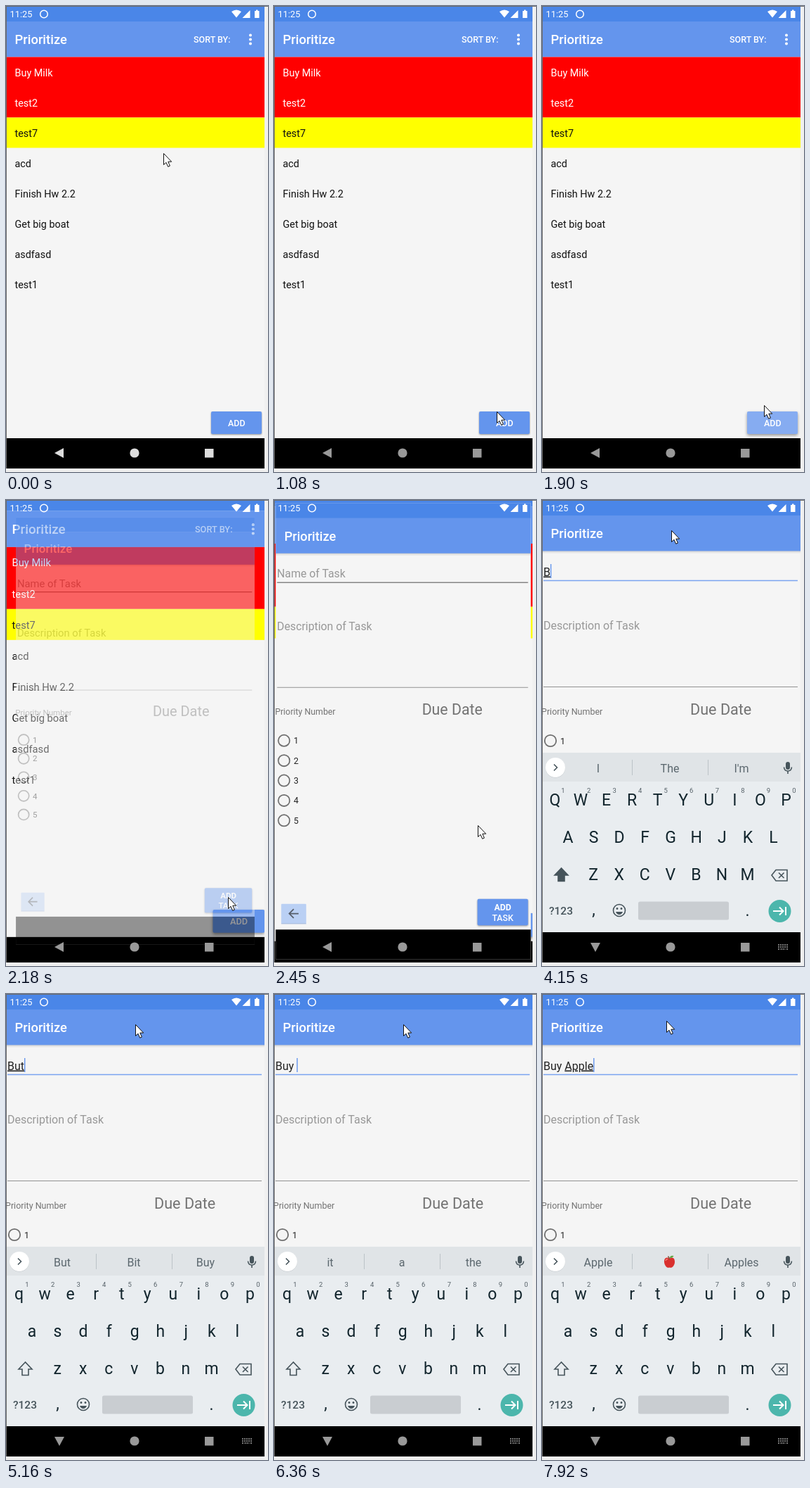
Write an HTML page that moves like this. It is 373 px wide and 662 px high and loops after 8 s.

```html
<!DOCTYPE html>
<html lang="en">
<head>
<meta charset="utf-8">
<title>Task list</title>
<style>
  html, body { margin: 0; width: 100%; height: 100%; overflow: hidden; background: #f0f0f0; }
  svg { display: block; width: 373px; height: 662px; font-family: Roboto, "Noto Sans", sans-serif; }
  text { white-space: pre; }
  .mid { text-anchor: middle; }
  .title { font-size: 18.4px; font-weight: 500; fill: #fff; }
  .label { font-size: 12.5px; font-weight: 500; fill: #fff; }
  .row { font-size: 14.4px; }
  .field { font-size: 16px; }
  .small { font-size: 12.5px; }
  .raised { fill: #6495ed; filter: drop-shadow(0 1px 1px rgba(0,0,0,.4)); }
  .key { font-size: 23px; fill: #12252d; }
  .digit { font-size: 9.5px; fill: #566168; }
  .line { fill: none; stroke: #46545b; stroke-width: 1.6; }
  .under { text-decoration: underline; text-decoration-thickness: 1px; text-underline-offset: 2px; }
</style>
</head>
<body>
<svg viewBox="0 0 373 662">
  <defs>
    <clipPath id="screen"><rect x="1" y="1" width="367" height="656"/></clipPath>
    <clipPath id="addShape"><rect x="292" y="576" width="72" height="32" rx="2"/></clipPath>
    <g id="bars">
      <rect width="368" height="657" fill="#f5f5f5"/>
      <rect y="22" width="368" height="50.5" fill="#6495ed"/>
      <rect width="368" height="22" fill="#4a86e8"/>
      <rect y="614" width="368" height="43"/>
      <text class="title" x="12.5" y="54">Prioritize</text>
    </g>
  </defs>
  <rect width="373" height="662" fill="#f0f0f0"/>
  <path d="M0 .5H373M.5 0V657" stroke="#6b6b6b"/>
  <g clip-path="url(#screen)">
    <rect width="368" height="657"/>
    <g id="list">
      <use href="#bars"/>
      <text class="label" x="267" y="52">SORT BY:</text>
      <g fill="#fff"><circle cx="348" cy="41.5" r="2"/><circle cx="348" cy="47.5" r="2"/><circle cx="348" cy="53.5" r="2"/></g>
      <rect y="72.5" width="368" height="86" fill="#f00"/>
      <rect y="158.5" width="368" height="43" fill="#ff0"/>
      <g id="rows"></g>
      <rect id="addButton" class="raised" x="292" y="576" width="72" height="32" rx="2"/>
      <g clip-path="url(#addShape)"><circle id="ripple" cx="317" cy="580" fill="#fff" opacity=".22"/></g>
      <text class="label mid" x="328.3" y="597">ADD</text>
    </g>
    <g id="form">
      <use href="#bars"/>
      <path d="M0 73H368" stroke="#000" stroke-opacity=".16"/>
      <path d="M0 74.5H368" stroke="#000" stroke-opacity=".06" stroke-width="2"/>
      <text id="hint" class="field" x="2" y="107.5" fill="#989898">Name of Task</text>
      <text id="entry" class="field" x="2" y="107.5" fill="#222"><tspan id="done"></tspan><tspan id="typing" class="under"></tspan></text>
      <path id="nameLine" d="M2 114.5H364" stroke-width="1.3"/>
      <rect id="caret" y="91" width="1.4" height="20" fill="#6495ed"/>
      <text class="field" x="2" y="183.5" fill="#989898">Description of Task</text>
      <path d="M2 265.5H364" stroke="#929292"/>
      <text class="small" x="-1" y="304.5" fill="#737373">Priority Number</text>
      <text x="211" y="305" font-size="21.6" fill="#737373">Due Date</text>
      <g id="radios"></g>
      <rect x="8" y="577" width="36" height="28.5" rx="1" fill="#bad0f4"/>
      <path d="M8 605.5H44" stroke="#9fb5da"/>
      <path d="M33 591H20M26 584.5L19.5 591L26 597.5" fill="none" stroke="#555d69" stroke-width="1.7"/>
      <rect class="raised" x="291" y="570" width="73" height="38" rx="2"/>
      <g class="label mid" font-weight="700"><text x="327.5" y="586.5" font-weight="700">ADD</text><text x="327.5" y="601.5">TASK</text></g>
    </g>
    <g id="keyboard">
      <rect y="359" width="368" height="256" fill="#e9edf0"/>
      <rect y="359" width="368" height="41" fill="#e0e4e7"/>
      <circle cx="19" cy="380.5" r="14" fill="#bfc5c9"/>
      <circle cx="19" cy="380" r="14" fill="#fff"/>
      <path class="line" d="M17 375.5L21.5 380L17 384.5"/>
      <path d="M128.5 369V391M236.5 369V391" stroke="#bcc3c7"/>
      <g id="words" class="field mid" fill="#5b676e"></g>
      <g id="apple">
        <path d="M181.5 376C177 372.500 173.500 376 174 381C174.500 386 178 390 181.500 388.500C185 390 188.700 386 189 381C189.300 376 186 372.500 181.500 376Z" fill="#d9302e"/>
        <path d="M176 379Q177 376 179 377" fill="none" stroke="#f58b80" stroke-width="1.3"/>
        <path d="M181.500 377Q181 374 179.500 372.500" fill="none" stroke="#74462c" stroke-width="1.300"/>
        <path d="M181.500 375Q183 370.500 187.500 372Q186 375.500 181.500 375Z" fill="#62a744"/>
      </g>
      <rect x="347" y="372" width="6" height="11" rx="3" fill="#46545b"/>
      <path class="line" d="M344.500 379.500Q345 385 350 385T355.500 379.500M350 385V389"/>
      <g id="keys"></g>
      <path id="shift" class="line" d="M27.500 523L18 533H23V541.500H32V533H37Z"/>
      <path class="line" d="M327 533L333 525.500H349V541H333ZM337 529.500L344.500 537M344.500 529.500L337 537"/>
      <text x="10" y="589" font-size="15.500" font-weight="500" fill="#46545b">?123</text>
      <text class="key mid" x="73.500" y="590">,</text>
      <text class="key mid" x="292.500" y="591">.</text>
      <circle class="line" cx="110" cy="583" r="8.500"/>
      <path d="M105 585H115Q113.500 589 110 589T105 585Z" fill="#46545b"/>
      <circle cx="107" cy="580.500" r="1.400" fill="#46545b"/><circle cx="113" cy="580.500" r="1.400" fill="#46545b"/>
      <rect x="137" y="570.500" width="129" height="26" rx="2.500" fill="#c9cdd1"/>
      <circle cx="338.500" cy="584" r="16" fill="#4cb6ac"/>
      <path d="M329 584H343M338 578.500L343.500 584L338 589.500M347 578V590" fill="none" stroke="#fff" stroke-width="2"/>
      <rect y="614" width="368" height="43"/>
    </g>
    <g fill="#fff">
      <text x="5.500" y="16" font-size="12.800">11:25</text>
      <circle cx="54" cy="11.500" r="5.300" fill="none" stroke="#fff" stroke-width="1.500"/>
      <path d="M321 8Q328 3 335 8L328 16.500ZM347.500 6V17H336.500ZM354 7H356V5.500H358.500V7H360.500V17H354Z"/>
    </g>
    <g id="nav">
      <path id="back" d="M69 635L82 628V642Z"/>
      <circle cx="183" cy="635" r="6.600"/>
      <rect x="283" y="629" width="12.500" height="12.500"/>
    </g>
    <path id="kbIcon" d="M336 632H350M336 635H350M336 638H338M339.500 638H346.500M348 638H350" stroke="#a0a0a0" stroke-width="1.700" stroke-dasharray="2 1"/>
  </g>
  <path id="pointer" d="M.5 .5V16.500L4 13.300L6.700 19.300L9.400 18.100L6.800 12.200H11.700Z" fill="#fff" stroke="#111"/>
</svg>
<script>
const LOOP = 8000;
const $ = id => document.getElementById(id);
const set = (id, attrs) => { for (const k in attrs) $(id).setAttribute(k, attrs[k]); };
const show = (id, on) => set(id, { visibility: on ? "visible" : "hidden" });
const clamp = v => Math.min(1, Math.max(0, v));
const smooth = u => u * u * (3 - 2 * u);
const mix = (a, b, u) => a + (b - a) * u;
const mixPoint = (a, b, u) => [mix(a[0], b[0], u), mix(a[1], b[1], u)];

// Progress that advances in n equal jumps, the first at `from`, the last at `to`.
const ticks = (t, from, to, n) => t < from ? 0
  : clamp((Math.floor((t - from) / (to - from) * (n - 1) + 1e-6) + 1) / n);
const held = (t, list) => list.filter(item => item[0] <= t).pop();

const tasks = ["Buy Milk", "test2", "test7", "acd", "Finish Hw 2.2", "Get big boat", "asdfasd", "test1"];
$("rows").innerHTML = tasks.map((name, i) =>
  `<text class="row" x="12.500" y="${99.500 + 43.050 * i}" fill="${i < 2 ? "#fff" : "#111"}">${name}</text>`).join("");

$("radios").innerHTML = [1, 2, 3, 4, 5].map((n, i) => {
  const y = 342 + 28.750 * i;
  return `<circle cx="12" cy="${y}" r="8.200" fill="none" stroke="#707070" stroke-width="1.800"/>
    <text class="small" x="26" y="${y + 4.500}" fill="#222">${n}</text>`;
}).join("");

const keyRows = [["qwertyuiop", 18.500, 434], ["asdfghjkl", 37, 486.500], ["zxcvbnm", 73.200, 539.500]];
$("keys").innerHTML = keyRows.map(([letters, x, y], row) => [...letters].map((c, i) => {
  const cx = x + 36.550 * i;
  const digit = row ? "" : `<text class="digit mid" x="${cx + 11.500}" y="416">${(i + 1) % 10}</text>`;
  return `<text class="key mid letter" x="${cx}" y="${y}">${c}</text>${digit}`;
}).join("")).join("");
const letters = [...document.querySelectorAll(".letter")];

$("words").innerHTML = [80, 182, 284].map(x => `<text x="${x}" y="386.500"></text>`).join("");
const words = [...$("words").children];

// time, committed text, text being composed, suggestions
const typing = [
  [0, "", "", "I,The,I'm"],
  [4150, "", "B", "I,The,I'm"],
  [4300, "", "B", "B,Be,By"],
  [4880, "", "Bu", "Buy,Bu,But"],
  [5160, "", "But", "But,Bit,Buy"],
  [5690, "", "Bu", "Buy,Bu,But"],
  [5840, "", "Buy", "Buy,Bye,But"],
  [6240, "Buy ", "", "Buy,Buying,Buyers"],
  [6360, "Buy ", "", "it,a,the"],
  [6790, "Buy ", "A", "A,a,An"],
  [6965, "Buy ", "Ap", "Ap,Apple,App"],
  [7140, "Buy ", "App", "App,Apple,Apps"],
  [7315, "Buy ", "Appl", "Apple,Apply,Application"],
  [7490, "Buy ", "Apple", "Apple,*,Apples"]
];

function pointerAt(t) {
  const start = [224, 209], menu = [347, 52], add = [317, 576], press = [316, 567], rest = [184, 43];
  if (t < 1510) {
    const u = ticks(t, 150, 1080, 8) * 2;
    return u <= 1 ? mixPoint(start, menu, smooth(u)) : mixPoint(menu, add, smooth(u - 1));
  }
  if (t < 2180) return mixPoint(add, press, ticks(t, 1510, 1900, 4));
  if (t < 3230) return mixPoint([316, 564], [186, 50], smooth(ticks(t, 2313, 3110, 7)));
  return t < 7920 ? rest : [177, 38];
}

function zoom(id, scale, cy) {
  set(id, { transform: `translate(184 ${cy}) scale(${scale}) translate(-184 ${-cy})` });
}

function drawScreens(t) {
  const since = Math.floor((t - 2180) / 133 + 1e-6) * 133;
  const p = since > 600 ? 1 : 1 - .51 * Math.exp(-since / 150);
  const opening = t >= 2180;
  zoom("list", opening ? 1 + .047 * p : 1, 317);
  zoom("form", opening ? .85 + .15 * p : 1, 325);
  show("form", opening);
  set("form", { opacity: clamp(.4 + since / 133 * .6) });

  const press = ticks(t, 1510, 1900, 4);
  set("ripple", { r: press > .25 && !opening ? press * 56 : 0 });
  $("addButton").style.filter = press > .25 ? "drop-shadow(0 2px 2px rgba(0,0,0,.4))" : "";
}

function drawEntry(t) {
  const [, done, composing, suggestions] = held(t, typing);
  $("done").textContent = done;
  $("typing").textContent = composing;
  show("hint", t >= 2180 && !done && !composing);
  set("nameLine", { stroke: t >= 2713 ? "#7aa3f0" : "#858585" });
  show("caret", t >= 2980);
  set("caret", { x: 2 + (done || composing ? $("entry").getComputedTextLength() : 0) });

  suggestions.split(",").forEach((word, i) => words[i].textContent = word === "*" ? "" : word);
  show("apple", suggestions.includes("*"));
  const upper = t < 4300;
  for (const key of letters) {
    const c = key.textContent;
    key.textContent = upper ? c.toUpperCase() : c.toLowerCase();
  }
  $("shift").style.fill = upper ? "#46545b" : "none";
}

function drawSystem(t) {
  const rise = held(t, [[0, 300], [3500, 70], [3620, 0]])[1];
  $("keyboard").style.display = rise === 300 ? "none" : "";
  set("keyboard", { transform: `translate(0 ${rise})` });
  const shade = Math.round(mix(221, 153, ticks(t, 150, 1080, 8)));
  set("nav", { fill: `rgb(${shade},${shade},${shade})` });
  const turn = held(t, [[0, 0], [3230, -3], [3350, -15], [3500, -70], [3620, -90]])[1];
  set("back", { transform: `rotate(${turn} 76 635)` });
  show("kbIcon", t >= 3230);
}

function render(t) {
  drawScreens(t);
  drawEntry(t);
  drawSystem(t);
  set("pointer", { transform: `translate(${pointerAt(t).map(Math.round).join(" ")})` });
}

let origin;
function loop(now) {
  origin ??= now;
  render((now - origin) % LOOP);
  requestAnimationFrame(loop);
}
render(0);
requestAnimationFrame(loop);
</script>
</body>
</html>
```
